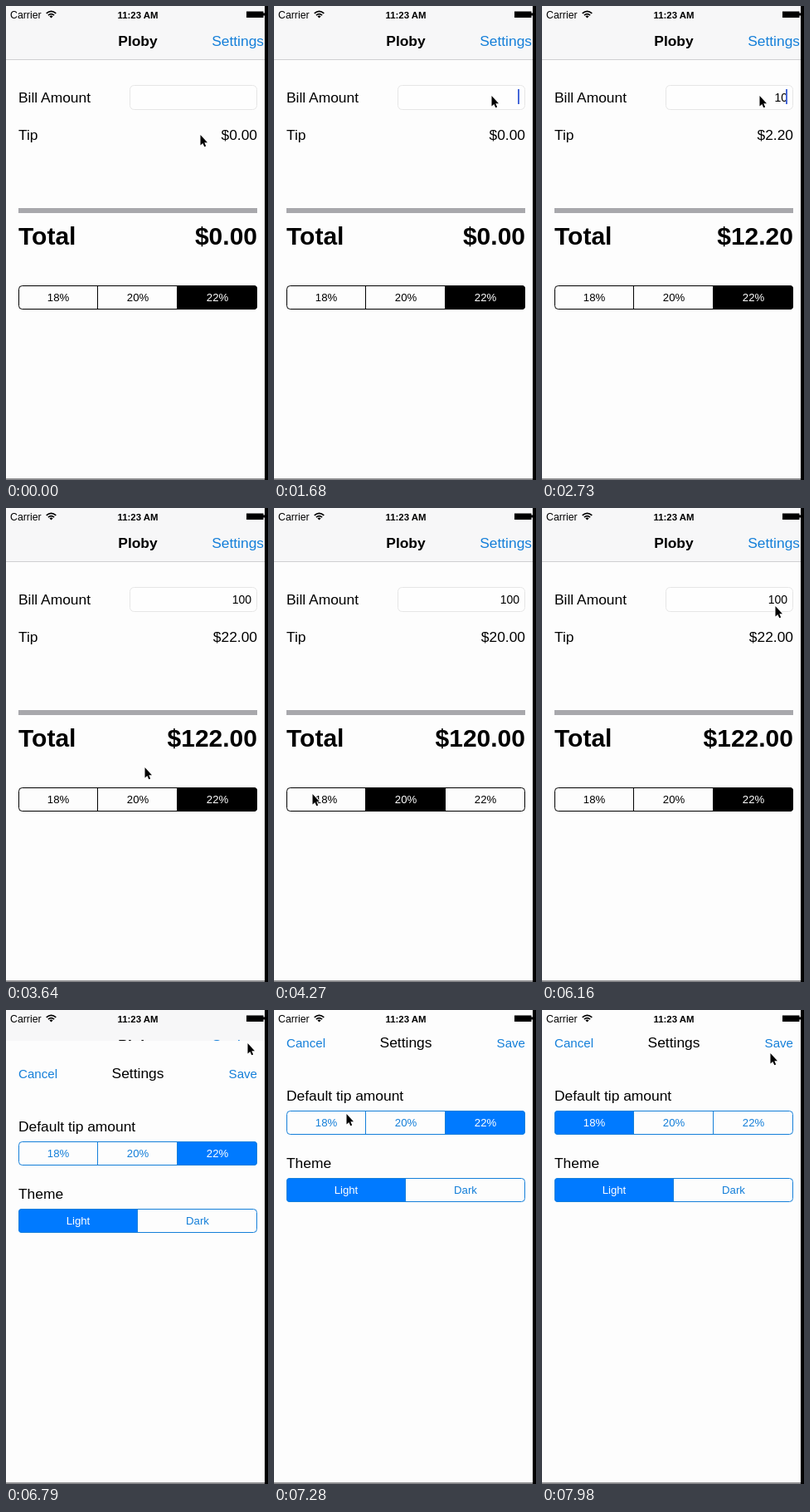
These frames come from a looping animation (316x570 px, 8000 ms). An HTML page:

```html
<!DOCTYPE html>
<html lang="en">
<head>
<meta charset="utf-8">
<title>Tip calculator</title>
<style>
  html, body { margin: 0; width: 100%; height: 100%; overflow: hidden; background: #000; }
  svg { display: block; width: 316px; height: 570px; }
  text { font: 17.4px "Liberation Sans", Arial, sans-serif; }
  .mid { text-anchor: middle; }
  .end { text-anchor: end; }
  .bold { font-weight: bold; }
  .big { font-size: 30px; font-weight: bold; }
  .small { font-size: 15.1px; }
  .seg { font-size: 13.2px; text-anchor: middle; }
  .link { fill: #147fd9; }
  .page { fill: #fdfdfd; }
  .fills { clip-path: inset(0 round 4px); }
</style>
</head>
<body>
<svg viewBox="0 0 316 570">
  <rect class="page" width="312" height="570"/>
  <rect width="312" height="64" fill="#f7f7f8"/>
  <rect y="64" width="312" height="1" fill="#cfcfd1"/>
  <text x="159" y="48" class="mid bold">Ploby</text>
  <text x="311" y="48" class="end link">Settings</text>

  <text x="15" y="116">Bill Amount</text>
  <rect x="149.5" y="95.5" width="153" height="29" rx="5" fill="#fefefe" stroke="#e6e6e6"/>
  <text x="296" y="115" class="end" id="bill" style="font-size:14px"></text>
  <rect x="294" y="100" width="2" height="18" fill="#4668d8" id="caret"/>
  <text x="15" y="161">Tip</text>
  <text x="303" y="161" class="end" id="tip"></text>
  <rect x="15" y="243" width="288" height="6" fill="#a8a8ac"/>
  <text x="15" y="286.5" class="big">Total</text>
  <text x="303" y="286.5" class="big end" id="total"></text>
  <g id="rates"></g>

  <g id="sheet">
    <rect class="page" width="312" height="570"/>
    <text x="15" y="45" class="small link">Cancel</text>
    <text x="159" y="45" class="mid">Settings</text>
    <text x="303" y="45" class="small end link">Save</text>
    <text x="15" y="109">Default tip amount</text>
    <g id="defaults"></g>
    <text x="15" y="190">Theme</text>
    <g id="themes"></g>
  </g>

  <text x="5" y="15" style="font-size:12.3px">Carrier</text>
  <g fill="none" stroke="#000" stroke-width="1.7">
    <path d="M48.7 8.9Q54.5 3.9 60.3 8.9M50.9 11.2Q54.5 8.1 58.1 11.2"/>
    <path d="M52.4 12.4Q54.5 10.8 56.6 12.4L54.5 14.6Z" fill="#000" stroke="none"/>
  </g>
  <text x="159" y="15" class="mid bold" style="font-size:11.4px">11:23 AM</text>
  <path d="M290 6.5h20.500v2h1.500v3h-1.500v2.500h-20.500Z"/>

  <rect y="568" width="312" height="2" fill="#8c8c8e"/>
  <rect x="312" width="4" height="570"/>
  <path id="cursor" d="M.5 1V13.500L3.300 10.900L5.300 15.300L7.200 14.500L5.300 10.200H9Z"
        stroke="#fff" stroke-width="1.8" paint-order="stroke"/>
</svg>
<script>
const LOOP = 8000, STEP = 70, FOCUS = 1400, FIRST_KEY = 2310, KEY_GAP = 245, SHEET = 6543;
const $ = id => document.getElementById(id);
const clamp = (v, max = 1) => Math.min(max, Math.max(0, v));
const easeOut = (p, power) => 1 - (1 - clamp(p)) ** power;

// Builds a segmented control; the returned function sets how selected each segment is.
function segments(id, y, labels, fill, ink) {
  const w = 288 / labels.length;
  const each = part => labels.map((label, i) => part(15 + i * w, label)).join('');
  const caption = (x, label, color) =>
    `<text class="seg" x="${x + w / 2}" y="${y + 19}" fill="${color}">${label}</text>`;
  $(id).innerHTML = `
    <g class="fills">${each(x => `<rect x="${x}" y="${y}" width="${w}" height="29" fill="${fill}"/>`)}</g>
    <g fill="none" stroke="${ink}">
      <rect x="15.5" y="${y + .5}" width="287" height="28" rx="4"/>
      ${each(x => x > 15 ? `<path d="M${x - .5} ${y}v29"/>` : '')}
    </g>
    <g>${each((x, label) => caption(x, label, ink))}</g>
    <g>${each((x, label) => caption(x, label, '#fff'))}</g>`;
  const [fills, , plain, lit] = $(id).children;
  return levels => levels.forEach((a, i) => {
    fills.children[i].setAttribute('opacity', a);
    lit.children[i].setAttribute('opacity', a);
    plain.children[i].setAttribute('opacity', 1 - a);
  });
}

const rates = [18, 20, 22], percents = rates.map(r => r + '%');
const setRates = segments('rates', 336, percents, '#000', '#000');
const setDefaults = segments('defaults', 121, percents, '#007aff', '#147fd9');
segments('themes', 202, ['Light', 'Dark'], '#007aff', '#147fd9')([1, 0]);

// Taps: time and segment. Moves: start, duration and where the pointer ends.
const rateTaps = [[-LOOP, 2], [3920, 1], [4410, 0], [5320, 1], [5820, 2]];
const defaultTaps = [[-LOOP, 2], [7490, 0]];
const moves = [
  [910, 490, 262, 107], [2940, 1050, 155, 337], [3990, 280, 46, 343], [5150, 670, 252, 352],
  [5880, 560, 291, 39], [7000, 420, 62, 135], [7560, 420, 275, 51]
];

// The newly tapped segment fades in while the one before it fades out.
function levels(taps, t) {
  const k = taps.findLastIndex(tap => tap[0] <= t);
  const p = clamp((t - taps[k][0]) / 250), out = [0, 0, 0];
  if (k) out[taps[k - 1][1]] = 1 - p ** 1.2;
  out[taps[k][1]] = p ** .8;
  return out;
}

function pointer(t) {
  let x = 234, y = 154;
  for (const [start, time, toX, toY] of moves) {
    const p = easeOut((t - start) / time, 2);
    x += (toX - x) * p;
    y += (toY - y) * p;
  }
  return `translate(${Math.round(x)} ${Math.round(y)})`;
}

function draw(t) {
  const typed = clamp(Math.floor((t - FIRST_KEY) / KEY_GAP) + 1, 3);
  const bill = '100'.slice(0, typed);
  const rate = rates[rateTaps.findLast(tap => tap[0] <= t)[1]] / 100;
  $('bill').textContent = bill;
  $('tip').textContent = '$' + (bill * rate).toFixed(2);
  $('total').textContent = '$' + (bill * (1 + rate)).toFixed(2);

  const since = t - (typed ? FIRST_KEY + (typed - 1) * KEY_GAP : FOCUS);
  $('caret').setAttribute('opacity', since >= 0 && since % 850 < 510 ? 1 : 0);
  setRates(levels(rateTaps, t));
  setDefaults(levels(defaultTaps, t));

  const y = Math.round(570 * (1 - easeOut((t - SHEET) / 500, 4)));
  $('sheet').setAttribute('transform', `translate(0 ${y})`);
  $('cursor').setAttribute('transform', pointer(t));
}

function tick() {
  draw(Math.floor(performance.now() % LOOP / STEP) * STEP);
  requestAnimationFrame(tick);
}
tick();
</script>
</body>
</html>
```
